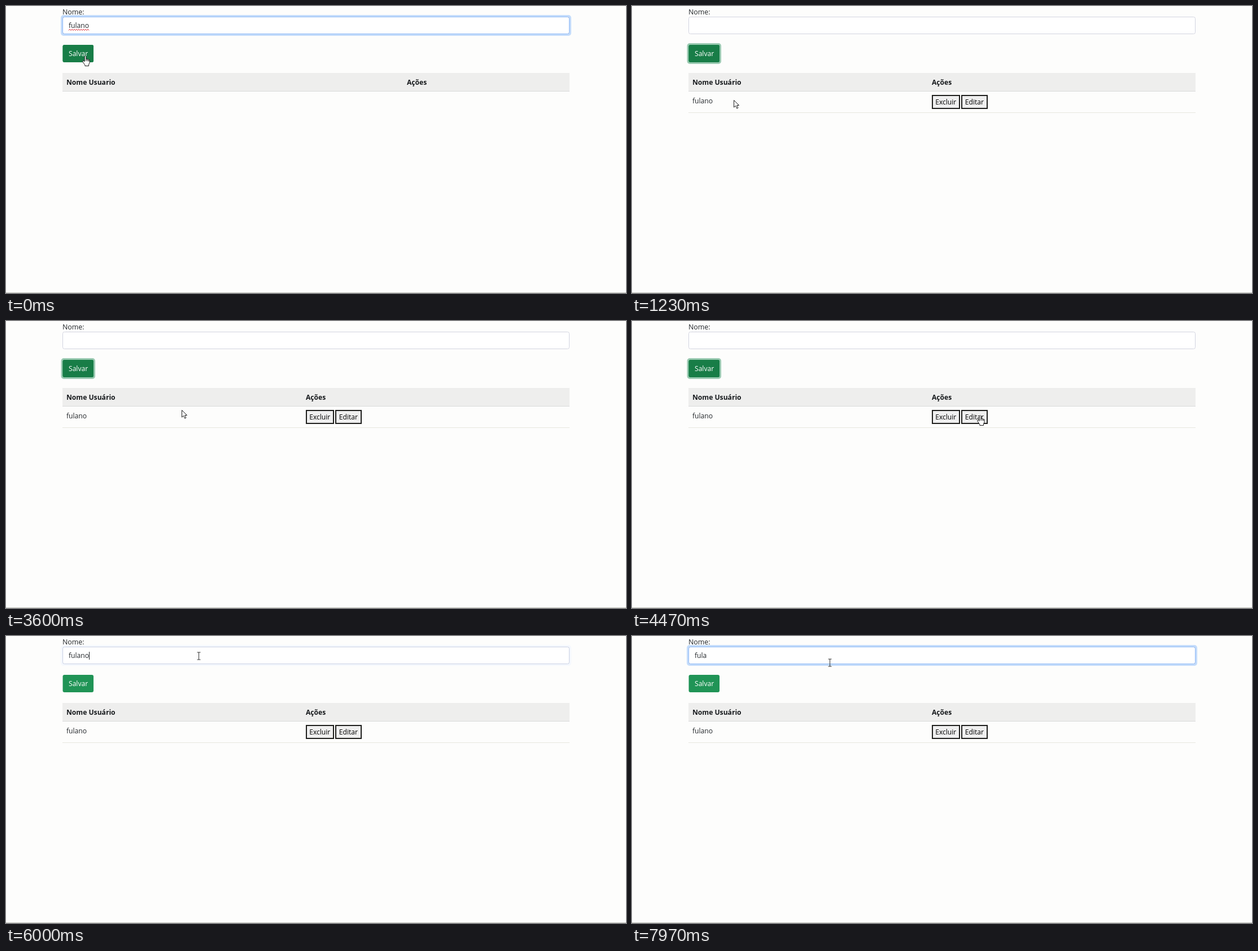
Recreate the animation shown at these times as an HTML page. Size 1098 px wide and 510 px high, loop 8000 ms.

```html
<!DOCTYPE html>
<html lang="pt-BR">
<head>
<meta charset="utf-8">
<title>Cadastro</title>
<style>
  html, body { margin: 0; width: 100%; height: 100%; overflow: hidden; background: #fdfdfc; }
  svg { display: block; }
  text { font: 12.1px "Open Sans", "Noto Sans", sans-serif; fill: #212529; }
  .label { font-size: 12.4px; }
  .bold { font-weight: 700; fill: #16191c; }
  .light { fill: #fff; }
  .action text { fill: #000; }
  .pointer { fill: #fff; stroke: #1c1c1c; stroke-linejoin: round; }
</style>
</head>
<body>
<svg width="1098" height="510" viewBox="0 0 1098 510">
  <text class="label" x="100" y="14.5">Nome:</text>
  <rect id="inputRing" x="97" y="16" width="904" height="37" rx="5" fill="#c4dcfb"/>
  <rect data-pointer="beam" x="100.5" y="19.5" width="897" height="30" rx="3" fill="#fff" stroke="#d2d4e0"/>
  <rect id="inputEdge" x="100.5" y="19.5" width="897" height="30" rx="3" fill="none" stroke="#8fbaf6"/>
  <text id="value" x="111" y="39"></text>
  <path id="squiggle" fill="none" stroke="#dc3b45"/>
  <rect id="caret" y="28" width="1" height="14" fill="#212529"/>

  <rect id="saveRing" x="97.5" y="66" width="60.5" height="37" rx="5" fill="#9bcab2"/>
  <rect data-pointer="hand" x="100.5" y="69" width="54.5" height="31" rx="3" fill="#209456"/>
  <rect id="saveDark" x="100.5" y="69" width="54.5" height="31" rx="3" fill="#187d47"/>
  <text class="light" x="111" y="89">Salvar</text>

  <rect x="100" y="119" width="898" height="32" fill="#eeeeed"/>
  <rect x="100" y="151" width="898" height="1" fill="#d9dada"/>
  <text class="bold" id="nameHead" x="107" y="140"></text>
  <text class="bold" id="actionHead" y="140">Ações</text>

  <g id="row">
    <text id="rowName" data-pointer="beam" x="107" y="173"></text>
    <rect x="100" y="189" width="898" height="1" fill="#e7e7df"/>
    <g class="action" transform="translate(531 158)">
      <rect data-pointer="hand" x="1" y="1" width="48" height="23" fill="#efefef" stroke="#1f1f1d" stroke-width="2"/>
      <text x="6.2" y="17">Excluir</text>
    </g>
    <g class="action" transform="translate(583 158)">
      <rect data-pointer="hand" x="1" y="1" width="45" height="23" fill="#efefef" stroke="#1f1f1d" stroke-width="2"/>
      <text x="6.8" y="17">Editar</text>
    </g>
  </g>

  <rect y="509" width="1098" height="1" fill="#c0c3b9"/>

  <g id="cursor">
    <path id="arrow" class="pointer" d="M0 0V12.5L3 9.8L5.2 14.6L7.3 13.6L5.2 9H9Z"/>
    <path id="hand" class="pointer" d="M-1.3 10V1.3Q0-1.3 1.4 1.3V6.2Q2 5.2 3.8 6.4Q4.6 5.6 6 7Q7.6 6.4 7.6 8.6V12L6 15.6V18H-.6V16.4L-4.6 10.6Q-5.6 8.6-3.8 8.6ZM1.4 6.2V9.5M3.8 6.4V9.7M6 7V9.9"/>
    <path id="beam" fill="none" stroke="#333" d="M-3-6.5H3M0-6.5V6.5M-3 6.5H3"/>
  </g>
</svg>
<script>
const LOOP = 8000, NAME = "fulano";
const SAVE = 420, EDIT = 4930, FILL = 5040, FOCUS = 5980, ERASE = [6270, 7450];

const HOME = { x: 140, y: 88 };
const MOVES = [
  { from: 800, to: 1230, x: 180, y: 167 },
  { from: 1700, to: 2450, x: 137, y: 173 },
  { from: 2900, to: 3350, x: 300, y: 158 },
  { from: 3500, to: 4400, x: 616, y: 167 },
  { from: 5090, to: 5470, x: 428, y: 71 },
  { from: 5470, to: 5900, x: 341, y: 35 },
  { from: 7550, to: 7900, x: 350, y: 47 }
];

const $ = id => document.getElementById(id);
const fade = (id, v) => $(id).setAttribute("opacity", Number(v));
const ramp = (t, from, to = from + 150) => Math.min(1, Math.max(0, (t - from) / (to - from)));
const smooth = k => k * k * (3 - 2 * k);

function setText(id, text) {
  if ($(id).textContent !== text) $(id).textContent = text;
}

function pointerAt(t) {
  return MOVES.reduce((p, m) => {
    const k = smooth(ramp(t, m.from, m.to));
    return { x: p.x + (m.x - p.x) * k, y: p.y + (m.y - p.y) * k };
  }, HOME);
}

// The pointer takes the shape asked for by the element beneath it.
function shapeAt(x, y) {
  const under = [...document.querySelectorAll("[data-pointer]")].find(el => {
    const box = el.getBoundingClientRect();
    return x >= box.left && x <= box.right && y >= box.top && y <= box.bottom;
  });
  return under ? under.dataset.pointer : "arrow";
}

function valueAt(t) {
  if (t < SAVE) return NAME;
  if (t < FILL) return "";
  return NAME.slice(0, NAME.length - ERASE.filter(e => t >= e).length);
}

function drawForm(t) {
  const focus = 1 - ramp(t, SAVE) + ramp(t, FOCUS);
  fade("inputRing", focus);
  fade("inputEdge", focus);
  fade("saveRing", ramp(t, SAVE) - ramp(t, EDIT));
  fade("saveDark", 1 - ramp(t, EDIT));

  setText("value", valueAt(t));
  fade("squiggle", t < SAVE);
  const lastEdit = [FOCUS, ...ERASE].filter(e => t >= e).pop();
  fade("caret", (t - lastEdit) % 1000 < 500);
  $("caret").setAttribute("x", Math.round(111 + $("value").getComputedTextLength()));
}

function drawTable(saved) {
  setText("nameHead", saved ? "Nome Usuário" : "Nome Usuario");
  $("actionHead").setAttribute("x", saved ? 531 : 710);
  fade("row", saved);
}

function drawPointer(t) {
  const { x, y } = pointerAt(t), shape = shapeAt(x, y);
  for (const id of ["arrow", "hand", "beam"]) fade(id, id === shape);
  $("cursor").setAttribute("transform", `translate(${Math.round(x) + .5} ${Math.round(y) + .5})`);
}

setText("rowName", NAME);
const waves = Math.round($("rowName").getComputedTextLength() / 4);
$("squiggle").setAttribute("d", "M111 43.5" + "l2-2.5l2 2.5".repeat(waves));

const start = performance.now();
function tick() {
  const t = (performance.now() - start) % LOOP;
  drawForm(t);
  drawTable(t >= SAVE);
  drawPointer(t);
  requestAnimationFrame(tick);
}
tick();
</script>
</body>
</html>
```
